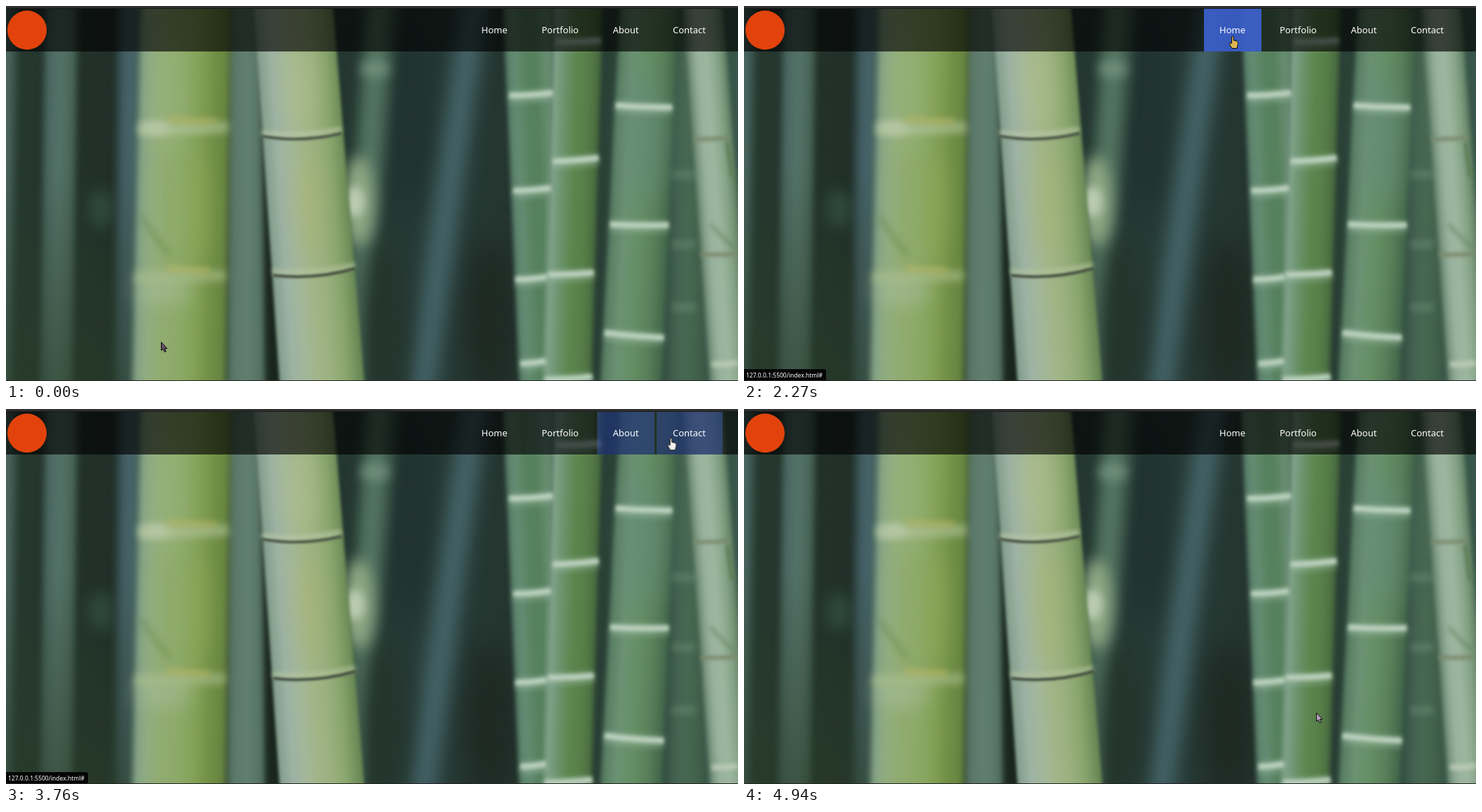
An HTML page with a canvas that plays this animation: 1044 px wide and 536 px high, repeating every 6160 ms.

```html
<!DOCTYPE html>
<html lang="en">
<head>
<meta charset="utf-8">
<title>Bamboo portfolio</title>
<style>
html, body { margin: 0; width: 100%; height: 100%; overflow: hidden; background: #22352f; }
canvas, svg { position: absolute; left: 0; top: 0; width: 1044px; height: 536px; }
text { font-family: "Noto Sans", "Open Sans", sans-serif; font-weight: 500; fill: #fff; }
.nav text { font-size: 13px; }
.status text { font-size: 8.5px; }

.hover rect { fill: #4169e1; fill-opacity: .95; opacity: 0; animation: 6160ms ease infinite; }
.hover .home { animation-name: home; }
.hover .portfolio { animation-name: portfolio; }
.hover .about { animation-name: about; }
.hover .contact { animation-name: contact; }
.status { animation: status 6160ms linear infinite; }
.cursor { animation: travel 6160ms linear infinite; }
.cursor path { stroke: #0b0b0d; stroke-width: 1; stroke-linejoin: round; }
.arrow { animation: arrow 6160ms step-end infinite; }
.hand { animation: hand 6160ms step-end infinite; }

@keyframes home {
  0%, 32.14% { opacity: 0 }
  40.26%, 44.8% { opacity: 1 }
  52.9%, 100% { opacity: 0 }
}
@keyframes portfolio {
  0%, 50.16% { opacity: 0 }
  55.4% { opacity: .74 }
  63.3%, 100% { opacity: 0 }
}
@keyframes about {
  0%, 55.6% { opacity: 0 }
  59.1% { opacity: .7 }
  66.6%, 100% { opacity: 0 }
}
@keyframes contact {
  0%, 59.1% { opacity: 0 }
  67.2%, 68.2% { opacity: 1 }
  76.1%, 100% { opacity: 0 }
}
@keyframes status {
  0%, 32.8% { opacity: 0 }
  33.8%, 48.8% { opacity: 1 }
  49.6%, 50.4% { opacity: 0 }
  51.2%, 72.7% { opacity: 1 }
  75.6%, 100% { opacity: 0 }
}
@keyframes travel {
  0% { transform: translate(221px, 480px) }
  11.53% { transform: translate(221px, 480px); animation-timing-function: ease-in-out }
  19.5% { transform: translate(712px, 235px) }
  20.8% { transform: translate(704px, 201px); animation-timing-function: ease-out }
  28.41%, 29% { transform: translate(695px, 88px) }
  31.5% { transform: translate(668px, 34px) }
  36.85%, 37.9% { transform: translate(697px, 43px) }
  41.9% { transform: translate(715px, 48px) }
  44.8% { transform: translate(742px, 66px) }
  47.24%, 48.3% { transform: translate(827px, 89px) }
  50.16% { transform: translate(802px, 62px) }
  52.6% { transform: translate(796px, 40px) }
  56%, 56.8% { transform: translate(873px, 33px) }
  59.1% { transform: translate(928px, 38px) }
  63.3% { transform: translate(972px, 45px) }
  67.2% { transform: translate(985px, 60px) }
  68.34%, 69.4% { transform: translate(986px, 79px); animation-timing-function: ease-in-out }
  74% { transform: translate(916px, 243px); animation-timing-function: ease-out }
  80.19%, 100% { transform: translate(816px, 434px) }
}
@keyframes arrow {
  0% { opacity: 1; fill: #6a4f6b }
  11.53% { opacity: 1; fill: #f0f0f0 }
  32.14% { opacity: 0; fill: #f0f0f0 }
  44.8% { opacity: 1; fill: #b8c4c4 }
  50.16% { opacity: 0; fill: #f0f0f0 }
  68% { opacity: 1; fill: #6a4f6b }
  80.19%, 100% { opacity: 1; fill: #bba6c4 }
}
@keyframes hand {
  0% { opacity: 0; fill: #dcb852 }
  32.14% { opacity: 1; fill: #dcb852 }
  44.8% { opacity: 0; fill: #f0f0f0 }
  50.16% { opacity: 1; fill: #f0f0f0 }
  68%, 100% { opacity: 0; fill: #f0f0f0 }
}
</style>
</head>
<body>
<canvas id="photo" width="1044" height="536"></canvas>
<svg viewBox="0 0 1044 536">
  <rect width="1044" height="4" fill="#303030"/>
  <rect y="3" width="1044" height="1" fill="#1b1b1b"/>
  <rect y="535" width="1044" height="1" fill="#252725"/>
  <rect y="4" width="1044" height="61" fill="#000" fill-opacity=".64"/>
  <circle cx="30" cy="34.5" r="28" fill="#e2430c"/>
  <g class="hover">
    <rect class="home" x="656" y="4" width="82" height="61"/>
    <rect class="portfolio" x="742" y="4" width="96" height="61"/>
    <rect class="about" x="843" y="4" width="82" height="61"/>
    <rect class="contact" x="928" y="4" width="94" height="61"/>
  </g>
  <g class="nav">
    <text x="678" y="39">Home</text>
    <text x="764" y="39">Portfolio</text>
    <text x="865.5" y="39">About</text>
    <text x="951" y="39">Contact</text>
  </g>
  <g class="status">
    <path d="M0 519H114Q117 519 117 522V535H0Z" fill="#050505"/>
    <text x="3" y="530.5">127.0.0.1:5500/index.html#</text>
  </g>
  <g class="cursor">
    <path class="arrow" d="M.5 .5V12.5L3.2 10.2 5.2 14.6 7.2 13.7 5.3 9.5H8.8Z"/>
    <path class="hand" d="M-1.4 .8Q0-.8 1.2 .8V6L6 7.2Q8 8 7.4 11.5L6 17.5H-1L-5 11Q-4.6 8.6-1.4 10.6Z"/>
  </g>
</svg>
<script>
const ctx = document.getElementById('photo').getContext('2d');
const W = 1044, H = 536;

function ramp(x0, y0, x1, y1, colors) {
  const g = ctx.createLinearGradient(x0, y0, x1, y1);
  colors.forEach((c, i) => g.addColorStop(i / (colors.length - 1), c));
  return g;
}

// A tapered, leaning stem: left edge and width at the top, then at the bottom.
function stalk(blur, x0, w0, x1, w1, ...colors) {
  ctx.save();
  ctx.filter = `blur(${blur}px)`;
  ctx.transform(1, 0, (x1 - x0) / H, 1, x0, 0);
  ctx.fillStyle = ramp(0, 0, (w0 + w1) / 2, 0, colors);
  ctx.beginPath();
  ctx.moveTo(0, -20);
  ctx.lineTo(w0, -20);
  ctx.lineTo(w1, H + 20);
  ctx.lineTo(0, H + 20);
  ctx.fill();
  ctx.restore();
}

function ring(x0, y0, x1, y1, color, width, blur = 2, sag = 2) {
  ctx.save();
  ctx.filter = `blur(${blur}px)`;
  ctx.strokeStyle = color;
  ctx.lineWidth = width;
  ctx.beginPath();
  ctx.moveTo(x0, y0);
  ctx.quadraticCurveTo((x0 + x1) / 2, (y0 + y1) / 2 + sag, x1, y1);
  ctx.stroke();
  ctx.restore();
}

// A pale joint with a soft halo.
function joint(x0, y0, x1, y1) {
  ring(x0, y0 + 2, x1, y1 + 2, 'rgba(160,190,165,.5)', 16, 4);
  ring(x0, y0, x1, y1, '#b9cfbc', 8, 2.5);
}

function glow(x, y, rx, ry, color, blur) {
  ctx.save();
  ctx.filter = `blur(${blur}px)`;
  ctx.fillStyle = color;
  ctx.beginPath();
  ctx.ellipse(x, y, rx, ry, 0, 0, 7);
  ctx.fill();
  ctx.restore();
}

ctx.fillStyle = ramp(0, 0, W, 0, ['#26392f', '#202f28', '#273a32', '#24352f', '#283d38', '#23332d', '#2c453a', '#38564a']);
ctx.fillRect(0, 0, W, H);
glow(575, 150, 40, 160, '#20322f', 25);
glow(690, 450, 35, 120, '#1e2923', 20);
glow(135, 290, 18, 28, '#304a3f', 10);

// Far stems
stalk(6, -20, 36, -25, 32, '#48655f', '#516d67', '#3b554e');
stalk(5, 56, 46, 49, 46, '#46625c', '#557369', '#445f52');
stalk(6, 160, 34, 156, 30, '#3a5357', '#48646a', '#41605f');
stalk(4, 318, 50, 316, 56, '#567265', '#628071', '#526f61');
stalk(8, 512, 48, 478, 38, '#40604f', '#597a66', '#395449');
stalk(11, 645, 46, 572, 46, '#34504f', '#4a6970', '#324c4b');
stalk(7, 951, 34, 942, 56, '#3c5848', '#4a6a55', '#416049');
ctx.fillStyle = ramp(0, 230, 0, H, ['rgba(42,62,40,0)', 'rgba(42,62,40,.55)']);
ctx.fillRect(0, 230, 185, H - 230);
glow(540, 460, 32, 130, '#24352d', 16);
glow(526, 90, 20, 12, '#708e7b', 8);
glow(503, 278, 20, 64, '#91aa85', 10);
glow(498, 280, 13, 22, '#b9cbb0', 6);
stalk(5, 364, 12, 371, 24, '#1d2a22', '#17231c');

// Near stems
stalk(4, 191, 130, 180, 134, '#7f9f88', '#92ad7e', '#90ab6e', '#8ca968', '#83a156', '#708f45', '#64813f');
glow(232, 130, 18, 90, 'rgba(160,188,135,.35)', 15);
glow(275, 290, 18, 75, 'rgba(150,176,86,.35)', 15);
glow(225, 405, 40, 22, 'rgba(170,192,158,.55)', 14);
glow(212, 174, 22, 9, 'rgba(200,213,190,.75)', 7);
ring(189, 177, 317, 173, 'rgba(180,198,160,.65)', 15, 6);
ring(232, 162, 300, 164, 'rgba(190,184,100,.6)', 8, 4);
ring(183, 388, 313, 385, 'rgba(170,190,140,.65)', 15, 6);
ring(230, 375, 290, 377, 'rgba(190,184,98,.6)', 8, 4);
ring(192, 300, 232, 355, 'rgba(92,124,60,.45)', 6, 5);

stalk(2, 353, 113, 390, 121, '#809b8a', '#9db2a3', '#a2b799', '#a1b587', '#98af7d', '#88a46c', '#688854');
glow(432, 285, 17, 75, 'rgba(178,183,105,.3)', 14);
glow(420, 115, 25, 65, 'rgba(184,199,150,.3)', 15);
ring(364, 181, 478, 176, 'rgba(188,202,170,.7)', 7, 3, 10);
ring(364, 186, 479, 182, '#4d5848', 4, 1.5, 12);
ring(380, 379, 498, 370, 'rgba(182,198,158,.7)', 7, 3, 10);
ring(381, 385, 499, 375, '#465142', 4, 1.5, 12);

stalk(3, 709, 73, 732, 40, '#587d6a', '#648c72', '#57825f', '#55805c', '#658c6e');
stalk(3, 781, 70, 767, 68, '#87a892', '#6c9470', '#5c864d', '#577e48', '#47693d');
stalk(3, 876, 83, 848, 88, '#55795f', '#6b9273', '#658f65', '#5a815a', '#42664a');
glow(911, 190, 27, 100, 'rgba(100,138,130,.5)', 18);
stalk(3, 966, 56, 1004, 60, '#698870', '#9ab29e', '#9cb69f', '#85a386', '#5d7d60');

joint(718, 128, 780, 124);
joint(724, 264, 777, 260);
joint(727, 391, 772, 387);
joint(734, 511, 770, 507);
joint(784, 51, 848, 49);
joint(780, 222, 845, 217);
joint(773, 384, 838, 381);
joint(769, 534, 836, 530);
joint(870, 142, 950, 145);
joint(862, 312, 945, 313);
joint(854, 467, 938, 474);
ring(980, 190, 1033, 188, '#788769', 5, 2.5);
ring(990, 355, 1042, 354, '#7b8669', 5, 2.5);
ring(1007, 512, 1044, 510, '#bfcfb7', 7, 3);
for (const y of [240, 340, 430]) ring(950, y, 984, y, 'rgba(120,152,130,.4)', 11, 5);
ring(1005, 312, 1038, 345, 'rgba(90,120,82,.5)', 5, 3);
ring(1029, 195, 1036, 245, '#5c7d54', 5, 2.5);
</script>
</body>
</html>
```
